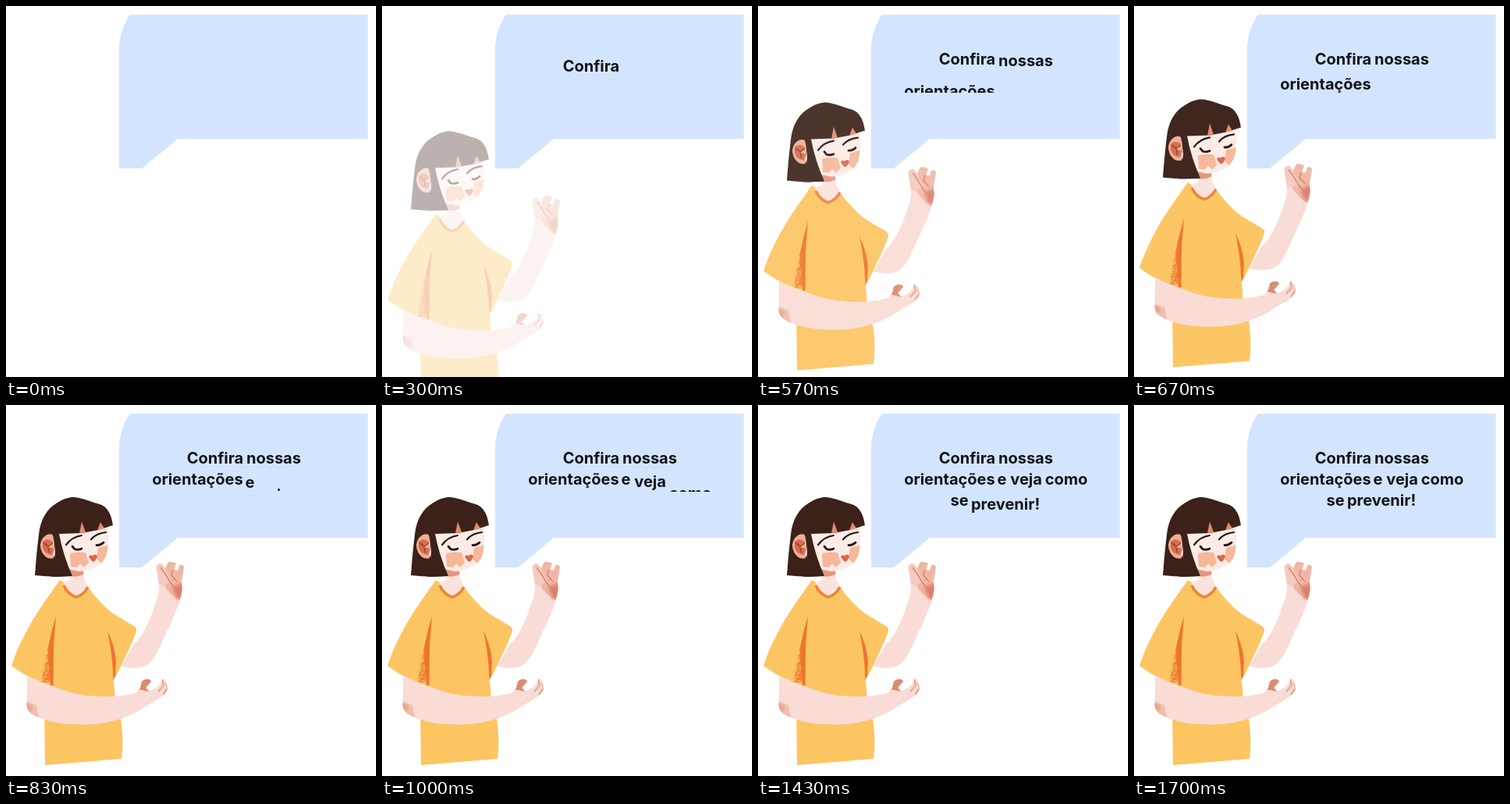
An HTML page for the animation above (5000 ms loop, 474 by 475 pixels).

```html
<!DOCTYPE html>
<html lang="pt-BR">
<head>
<meta charset="utf-8">
<title>Confira nossas orientações</title>
<style>
  html, body { margin: 0; width: 100%; height: 100%; overflow: hidden; background: #fff; }
  svg { display: block; width: 474px; height: 475px; }
  text { font: 700 20px Inter, "Liberation Sans", sans-serif; fill: #121418; }
  #woman { opacity: 0; }
  #words { visibility: hidden; }
</style>
</head>
<body>
<svg viewBox="0 0 474 475">
  <defs>
    <clipPath id="row0"><rect x="146" y="50" width="317" height="34"/></clipPath>
    <clipPath id="row1"><rect x="146" y="77" width="317" height="34"/></clipPath>
    <clipPath id="row2"><rect x="146" y="104" width="317" height="34"/></clipPath>
    <clipPath id="forearmClip"><use href="#forearm"/></clipPath>
    <clipPath id="faceClip"><use href="#face"/></clipPath>
    <clipPath id="raisedClip"><use href="#raised"/></clipPath>
    <filter id="soft" x="-50%" y="-50%" width="200%" height="200%"><feGaussianBlur stdDeviation="2"/></filter>
  </defs>

  <path fill="#d3e5fe" d="M145 208V56C145 38 151 22 159 11H463.5V170H220L174 208Z"/>

  <g id="woman">
    <!-- raised arm -->
    <path id="raised" fill="#f9dcd5" d="M148 334L164 306C174 298 181 282 187 267C192 253 196 243 196 234C196 224 193 216 192.500 207Q195 203 199 203L204 209L208 201Q213 200 218 203L215 211L220 212L222 205Q226 204 228 207L225.500 222C224 229 227 233 225 240C223 255 212 278 204 294C197 311 190 326 182 332C173 338 159 338 148 334Z"/>
    <g clip-path="url(#raisedClip)">
      <path fill="#f0b7a5" d="M204 199L230 198L228 236L222 250C214 246 203 235 201 226L205 214Z"/>
      <path fill="#f6cabd" d="M190 200H201L206 214L212 226L202 231L196 230Z"/>
      <path fill="#dd7d65" filter="url(#soft)" d="M213 234L227 227L225 248L219 248Z"/>
      <path fill="none" stroke="#d9856c" stroke-width="1.600" d="M198 208Q203 214 208 223T221 239M214 211L212 218L219 226"/>
    </g>

    <!-- shirt -->
    <path fill="#fdc562" d="M69 224L75 228L92 242L104 232C113 244 126 259 136 266C146 273 158 279 165 284Q168 286 167 289C164 300 153 322 147 335L138 352L140 378L147 402C150 422 150 438 148 453L50 461L49 385L54 358C37 354 20 343 7 334C14 312 25 291 35 274C46 256 58 240 69 224Z"/>
    <path fill="#f2913a" opacity=".45" filter="url(#soft)" d="M59 306L59 357L48 353L50 332Z"/>
    <g id="grain" fill="#e97a35"></g>
    <path fill="#ee742c" d="M64 270C60 285 54 302 54 321L57 359H60.500L61 308Z"/>
    <path fill="#ee742c" d="M130 289C135 300 140 313 141 329L140 346L137.500 352C137 330 134 309 130 289Z"/>

    <!-- neck -->
    <path fill="#fae3dc" d="M81 208H100L100 223L105 232L92 245Q80 240 73 228L82 224Z"/>
    <path fill="#e6957d" d="M80 209H99L99 217Q92 221 82 219Z"/>
    <path fill="none" stroke="#ea8440" stroke-width="3.500" d="M74 231Q79 243 90 246Q100 243 105 233"/>

    <!-- head -->
    <path id="face" fill="#fdebe5" d="M64 158L132 154C131 166 132 180 128 194C122 206 108 212 94 213L78 210Z"/>
    <g clip-path="url(#faceClip)" fill="#f6b898">
      <path d="M82 190Q92 187 102 189L106 202L100 208L95 203L91 208L83 207Z"/>
      <path d="M118 183L132 179V200L122 203L116 197Z"/>
    </g>
    <path fill="#3b2119" d="M37 218Q39 190 42 166C44 146 53 132 66 125C74 120 80 118 87 118C99 119 108 124 120 127C130 130 135 140 137 154L118 160L97 164L67 165L60 192L84 219Q60 221 37 218Z"/>
    <path fill="#e58a6c" d="M97 149L102 163L94 164.500Z M121 150L126 158L117 160.500Z"/>
    <path fill="#f0ad93" d="M63 168C55 161 45 169 44 179C44 190 52 199 61 196Z"/>
    <path fill="#d76c4c" d="M47 175Q54 169 60 176L54 182L61 184L59 192Q49 191 47 182Z"/>
    <path fill="none" stroke="#8c3e2b" stroke-width="1.300" d="M48 177Q56 179 55 189M54 181L60 177"/>
    <path fill="#3b2119" d="M58 160L68 165Q73 192 85 219L58 220L62 197Q65 181 58 160Z"/>
    <g fill="none" stroke="#21151a" stroke-linecap="round">
      <path stroke-width="2.200" d="M77 179Q84 169 97 167M109 172Q116 164 128 163"/>
      <path stroke-width="2.800" d="M85 181L88 184.500Q92 186 97 184M116 179.500Q121 180 125 176"/>
    </g>
    <path fill="#d9674d" d="M106 194Q108 191 111 193Q114 190 117 193Q116 198 112 201Q108 199 106 194Z"/>

    <!-- lower arm -->
    <path id="forearm" fill="#f9dcd5" d="M27 346Q42 354 60 360Q79 368 97 371Q118 374 140 373Q156 372 167 368L172 362L174 354C177 350 185 350 186 354L180 361L184 366Q194 363 198 356L200 351Q204 350 205 356Q208 362 206 367C201 375 189 379 179 386C161 398 137 408 104 409C76 410 48 405 34 396Q27 392 26.500 384Z"/>
    <g clip-path="url(#forearmClip)">
      <path fill="#f1bfae" d="M26 381L39 384L42 400L26 400Z"/>
      <path fill="#e7a08c" filter="url(#soft)" d="M25 381L32 383L34 392L25 392Z"/>
      <path fill="#dd896f" d="M172 355L182 348L188 354L179 362L183 367L170 364Z"/>
      <path fill="none" stroke="#e8aa96" stroke-width="2.500" d="M200 351L202 359L195 367M205 354L207 362L201 371"/>
    </g>
  </g>

  <g id="words">
    <g clip-path="url(#row0)"><text x="231.700" y="75.300">Confira</text></g>
    <g clip-path="url(#row0)"><text x="308" y="75.300">nossas</text></g>
    <g clip-path="url(#row1)"><text x="187.200" y="102.300">orientações</text></g>
    <g clip-path="url(#row1)"><text x="306.500" y="102.300">e</text></g>
    <g clip-path="url(#row1)"><text x="323.300" y="102.300">veja</text></g>
    <g clip-path="url(#row1)"><text x="367.700" y="102.300">como</text></g>
    <g clip-path="url(#row2)"><text x="246.500" y="129.300">se</text></g>
    <g clip-path="url(#row2)"><text x="273" y="129.300">prevenir!</text></g>
  </g>
</svg>
<script>
  const LOOP = 5000, TICK = 1000 / 30, SHOW = 230;
  const woman = document.getElementById('woman');
  const words = document.getElementById('words');
  const texts = [...words.querySelectorAll('text')];

  // Speckled shading beside the left fold of the shirt
  let seed = 90210;
  const rand = () => (seed = (seed * 16807) % 2147483647) / 2147483647;
  let dots = '';
  for (let i = 0; i < 240; i++) {
    const k = Math.sqrt(rand());
    const x = 59 - rand() * (3 + 10 * k), y = 298 + 57 * k;
    dots += `<circle cx="${x.toFixed(1)}" cy="${y.toFixed(1)}" r=".65"/>`;
  }
  document.getElementById('grain').innerHTML = dots;

  // Remaining share of a cubic ease-out
  const left = (t, start, span) =>
    (1 - Math.min(1, Math.max(0, (t - start) / span))) ** 3;

  const rise = (el, y) => el.setAttribute('transform', `translate(0 ${y.toFixed(2)})`);

  function draw(now) {
    const t = Math.floor((now % LOOP + 3.4) / TICK) * TICK;
    const rest = t < SHOW ? 1 : left(t, 219, 625);
    woman.style.opacity = 1 - rest;
    rise(woman, 64 * rest);
    words.style.visibility = t < SHOW ? 'hidden' : 'visible';
    texts.forEach((el, i) => rise(el, 25 * left(t, 184 + 154 * i, 400)));
  }

  const begin = performance.now();
  function loop() {
    draw(performance.now() - begin);
    requestAnimationFrame(loop);
  }
  loop();
</script>
</body>
</html>
```
